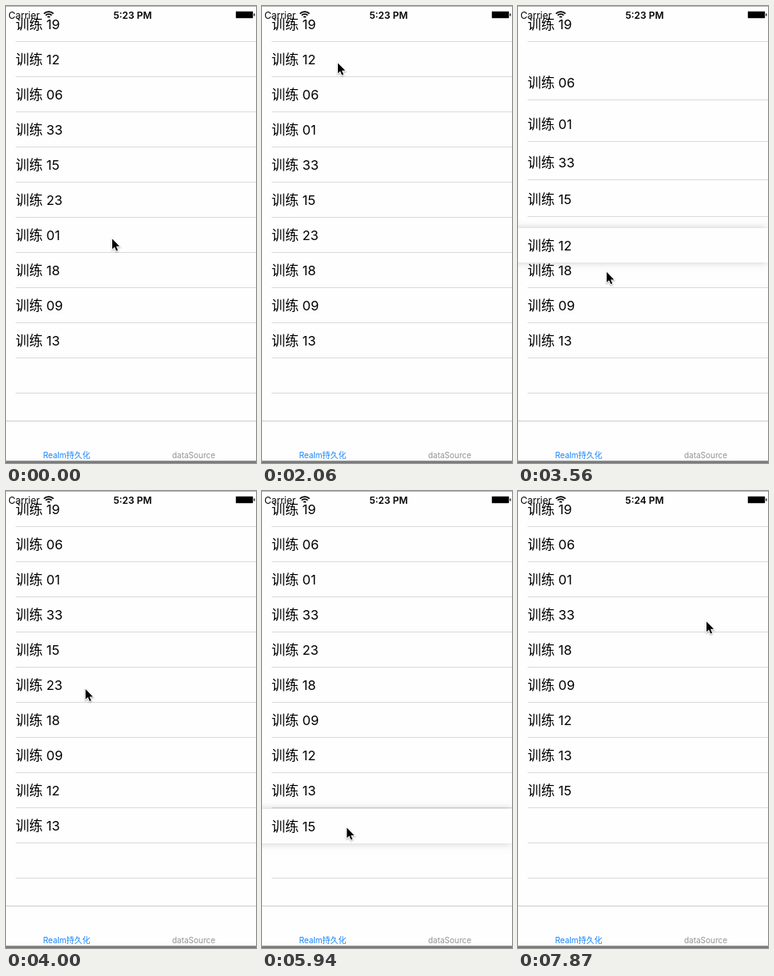
An HTML page with a canvas for the animation above (8 s loop, 313 px wide and 572 px high).

```html
<!DOCTYPE html>
<html lang="zh-CN">
<head>
<meta charset="utf-8">
<style>
  html, body { margin: 0; width: 100%; height: 100%; overflow: hidden; background: #fefefe; }
  canvas { display: block; }
</style>
</head>
<body>
<canvas id="stage" width="313" height="572"></canvas>
<script>
const ctx = document.getElementById('stage').getContext('2d');
const W = 313, H = 572, ROW = 44, LOOP = 8000;
const WHITE = '#fefefe', LINE = '#dadadc';
const FAMILY = "Inter, 'Noto Sans CJK SC', 'Noto Sans CJK', 'Noto Sans', sans-serif";
const ITEMS = ['19', '12', '06', '33', '15', '23', '01', '18', '09', '13'];

// The picture only changes at evenly spaced steps inside these spans: [from, to, steps]
const TIMES = [0];
for (const [a, b, n] of [[750, 1770, 8], [1910, 2060, 2], [3110, 4150, 8],
                         [5350, 6390, 8], [6540, 7270, 6], [7570, 7870, 3]])
  for (let i = 0; i < n; i++) TIMES.push(Math.floor((a + (b - a) * i / (n - 1)) / 10) * 10);

// The pointer eases from place to place; a move with from/to also carries a row
const HOME = { x: 133, y: 291 };
const MOVES = [
  { start: 934, dur: 410, x: 114, y: 115, from: 6, to: 3, lift: 750, lag: 4 },
  { start: 1500, dur: 560, x: 95, y: 71 },
  { start: 3362, dur: 260, x: 114, y: 380, from: 1, to: 8, lift: 3110, lag: 22 },
  { start: 3720, dur: 430, x: 95, y: 205 },
  { start: 5270, dur: 460, x: 106, y: 424, from: 4, to: 9, lift: 5350, lag: 25 },
  { start: 5900, dur: 490, x: 128, y: 205 },
  { start: 6450, dur: 230, x: 44, y: 203 },
  { start: 6700, dur: 450, x: 245, y: 206 },
  { start: 7480, dur: 390, x: 236, y: 163 }
];
const DRAGS = MOVES.filter(m => m.lift);
const [swipe, , remove] = MOVES.slice(-3);
const SWIPED = '23', SLIDE = 300, HOLD = 100, SETTLE = 150, BUTTON = 82;

const clamp = u => Math.min(1, Math.max(0, u));
const ease = u => (u = clamp(u)) < .5 ? 2 * u * u : 1 - 2 * (1 - u) ** 2;
const unease = f => f < .5 ? Math.sqrt(f / 2) : 1 - Math.sqrt((1 - f) / 2);
const progress = (m, t) => ease((t - m.start) / m.dur);

function pointerAt(t) {
  let { x, y } = HOME;
  for (const m of MOVES) {
    const u = progress(m, t);
    x += (m.x - x) * u;
    y += (m.y - y) * u;
  }
  return { x, y };
}

function rect(color, x, y, w, h) {
  ctx.fillStyle = color;
  ctx.fillRect(x, y, w, h);
}

function text(str, x, y, size, color = '#000', align = 'left', weight = 400) {
  ctx.font = `${weight} ${size}px ${FAMILY}`;
  ctx.fillStyle = color;
  ctx.textAlign = align;
  ctx.fillText(str, x, y);
}

function label(item, x, top) {
  text('训练', x + 12, top + 29, 17);
  text(item, x + 50.5, top + 29, 16.5);
}

function row(item, top, offset) {
  rect(WHITE, 0, top + 1, W, ROW);
  label(item, -offset, top);
  if (offset) {
    rect('#ff3b30', 317 - offset, top + 1, BUTTON, ROW);
    text('Delete', 358 - offset, top + 29, 17, '#fff', 'center');
  }
  rect(LINE, 12, top + ROW, W, 1);
}

function card(item, top) {
  ctx.save();
  ctx.shadowColor = 'rgba(0,0,0,.2)';
  ctx.shadowBlur = 9;
  ctx.shadowOffsetX = -5;
  rect(WHITE, 0, top + 1, 317, ROW - 1);
  ctx.restore();
  label(item, 0, top);
}

// Rows give way once the card's centre passes their near edge
function giveWay(d, order, t) {
  const y0 = pointerAt(d.start).y, dir = Math.sign(d.to - d.from), shift = {};
  for (let slot = d.from + dir; slot !== d.to + dir; slot += dir) {
    const edge = ROW * (dir > 0 ? slot : slot + 1);
    const passed = d.start + d.dur * unease((edge - y0) / (d.y - y0)) + d.lag;
    shift[order[slot]] = -dir * ROW * ease((t - passed) / SLIDE);
  }
  return shift;
}

function list(t) {
  const order = [...ITEMS];
  let shift = {}, held = null;
  for (const d of DRAGS) {
    if (t < d.lift) break;
    const item = order[d.from], drop = d.start + d.dur + HOLD;
    if (t >= drop + SETTLE) {
      order.splice(d.from, 1);
      order.splice(d.to, 0, item);
      continue;
    }
    shift = giveWay(d, order, t);
    const top = pointerAt(Math.min(t, drop) - d.lag).y - ROW / 2;
    held = { item, top: Math.round(top + (d.to * ROW - top) * ease((t - drop) / SETTLE)) };
  }

  const closed = progress(remove, t), gone = order.indexOf(SWIPED);
  const visible = item => item !== held?.item && (item !== SWIPED || closed < 1);
  order.forEach((item, i) => {
    const lift = i > gone ? ROW * closed : 0;
    const top = Math.round(i * ROW + (shift[item] || 0) - lift);
    if (visible(item)) row(item, top, item === SWIPED ? BUTTON * progress(swipe, t) : 0);
  });
  for (const y of [440, 484]) rect(LINE, 12, y, W, 1);
  if (held) card(held.item, held.top);
}

function statusBar(t) {
  text('Carrier', 3, 15.5, 12);
  text(t < 6980 ? '5:23 PM' : '5:24 PM', 158.5, 15.5, 12, '#000', 'center', 600);
  ctx.strokeStyle = '#000';
  ctx.lineWidth = 1.8;
  for (const r of [8.4, 5.4, 2]) {
    ctx.beginPath();
    ctx.arc(53.5, 15.5, r, -Math.PI * .75, -Math.PI * .25);
    ctx.stroke();
  }
  ctx.strokeStyle = '#999';
  ctx.lineWidth = .6;
  ctx.beginPath();
  ctx.roundRect(287.4, 6.4, 22, 9.2, 1.8);
  ctx.stroke();
  rect('#000', 288, 7, 21, 8);
  rect('#000', 310.2, 9.5, 1.3, 3);
}

function tabBar() {
  rect(WHITE, 0, 519, W, 53);
  rect('#cbcbcb', 0, 519, W, 1);
  text('Realm持久化', 76, 566, 10, '#1583ff', 'center');
  text('dataSource', 235, 566, 10, '#929292', 'center');
}

function windowEdge() {
  rect('#b4b4b4', 0, 0, W, 1);
  const g = ctx.createLinearGradient(0, 569, 0, H);
  g.addColorStop(0, '#999');
  g.addColorStop(1, '#6c6c6c');
  rect(g, 0, 569, W, 3);
}

const ARROW = new Path2D('M0 0V14.5L3.4 11.4 5.8 17 8 16 5.6 10.6H10.4Z');
function pointer({ x, y }) {
  ctx.save();
  ctx.translate(x, y + .5);
  ctx.scale(.88, .88);
  ctx.shadowColor = 'rgba(0,0,0,.35)';
  ctx.shadowBlur = 2;
  ctx.shadowOffsetY = 1;
  ctx.strokeStyle = '#fff';
  ctx.lineWidth = 2;
  ctx.stroke(ARROW);
  ctx.shadowColor = 'transparent';
  ctx.fillStyle = '#000';
  ctx.fill(ARROW);
  ctx.restore();
}

function draw() {
  const now = performance.now() % LOOP;
  const t = TIMES.filter(x => x <= now).pop();
  rect(WHITE, 0, 0, W, H);
  list(t);
  tabBar();
  statusBar(t);
  windowEdge();
  pointer(pointerAt(t));
  requestAnimationFrame(draw);
}
draw();
</script>
</body>
</html>
```
